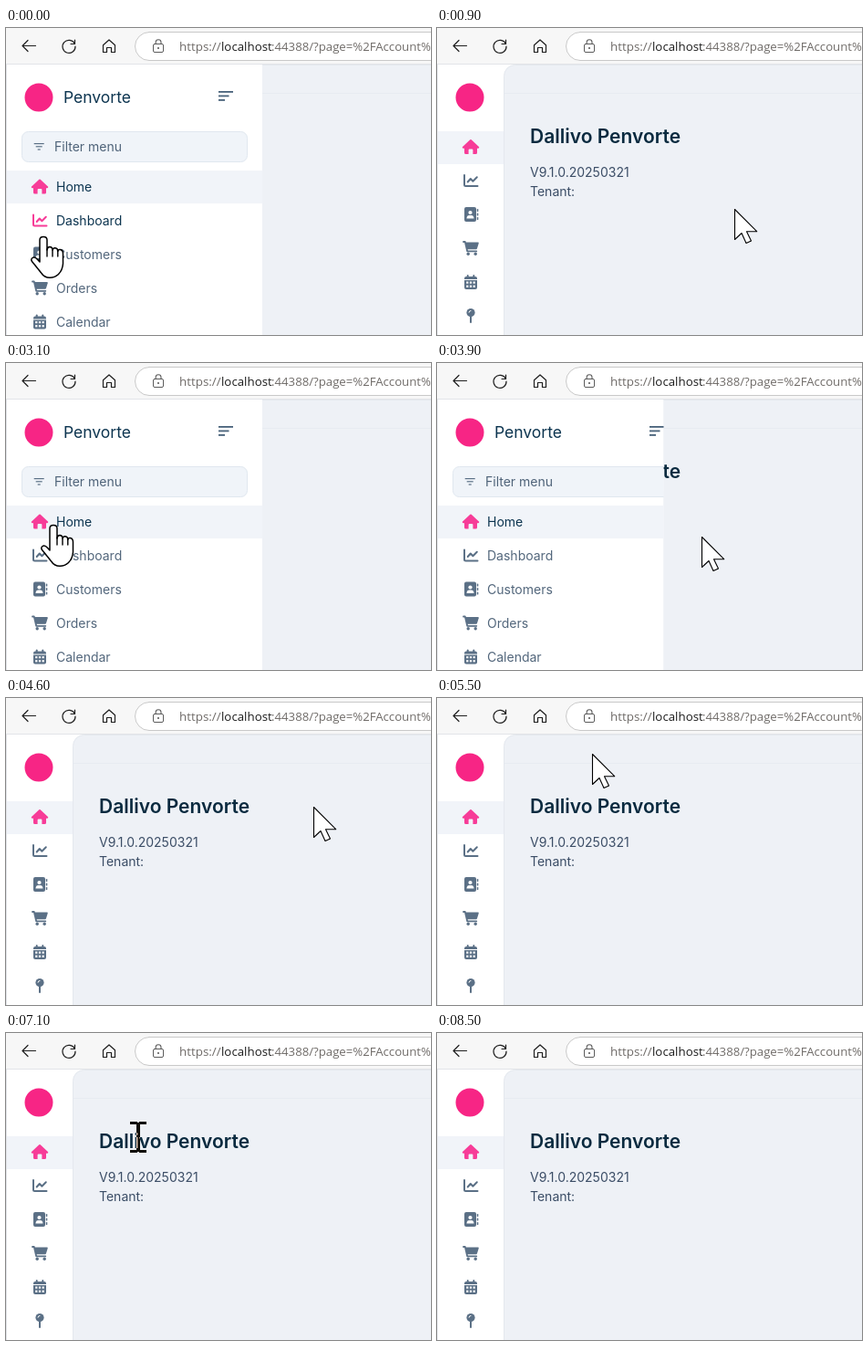
These frames come from a looping animation (466x336 px, 8600 ms). An HTML page with a canvas:

```html
<!DOCTYPE html>
<html lang="en">
<head>
<meta charset="utf-8">
<title>Sidebar menu</title>
<style>
html, body { margin: 0; width: 100%; height: 100%; overflow: hidden; background: #eef1f6; }
canvas { display: block; width: 466px; height: 336px; }
</style>
</head>
<body>
<canvas id="stage" width="466" height="336"></canvas>
<script>
const ctx = document.getElementById('stage').getContext('2d');
const LOOP = 8600, STEP = 100;
const NARROW = 73, WIDE = 281;
const PINK = '#f73c98', GRAY = '#5b7086', DARK = '#0d3550', PAGE = '#eef1f6', ACTIVE = '#f1f4f9';
const UI = 'Inter, Roboto, sans-serif';
const CHROME = '"Open Sans", "Noto Sans", sans-serif';

// Pointer stops: time, x, y
const STOPS = [
  [0, 41, 229], [200, 62, 226], [600, 312, 206], [900, 326, 198], [1700, 270, 188],
  [2100, 219, 180], [2400, 64, 182], [2700, 50, 176], [3100, 52, 178],
  [3500, 58, 238], [3650, 84, 236], [4000, 372, 172], [4300, 388, 138], [4600, 337, 119],
  [5500, 170, 61], [6300, 142, 108], [7100, 145, 114], [7300, 150, 112],
  [7900, 452, 22], [8100, 490, -20]
];
const OPENINGS = [[-1000, 500], [2300, 3850]];
const SLIDE = 200;

const clamp = v => Math.max(0, Math.min(1, v));
const ease = v => v * v * (3 - 2 * v);

function pointerAt(t) {
  for (let i = 1; i < STOPS.length; i++) {
    const [t0, x0, y0] = STOPS[i - 1], [t1, x1, y1] = STOPS[i];
    if (t <= t1) {
      const k = (t - t0) / (t1 - t0);
      return { x: x0 + (x1 - x0) * k, y: y0 + (y1 - y0) * k };
    }
  }
  return null;
}

function openness(t) {
  let most = 0;
  for (const [a, b] of OPENINGS) {
    most = Math.max(most, Math.min(clamp((t - a) / SLIDE), 1 - clamp((t - b) / SLIDE)));
  }
  return ease(most);
}

function text(str, x, y, size, color, weight = 400, family = UI) {
  ctx.font = `${weight} ${size}px ${family}`;
  ctx.fillStyle = color;
  ctx.fillText(str, x, y);
}

function box(x, y, w, h, r, fill, stroke) {
  ctx.beginPath();
  ctx.roundRect(x, y, w, h, r);
  if (fill) { ctx.fillStyle = fill; ctx.fill(); }
  if (stroke) { ctx.strokeStyle = stroke; ctx.lineWidth = 1; ctx.stroke(); }
}

function disc(x, y, r, color) {
  ctx.beginPath();
  ctx.arc(x, y, r, 0, Math.PI * 2);
  ctx.fillStyle = color;
  ctx.fill();
}

function line(d, color, width) {
  ctx.strokeStyle = color;
  ctx.lineWidth = width;
  ctx.stroke(new Path2D(d));
}

function shape(d, color) {
  ctx.fillStyle = color;
  ctx.fill(new Path2D(d));
}

function at(x, y, draw) {
  ctx.save();
  ctx.translate(x, y);
  ctx.lineCap = ctx.lineJoin = 'round';
  draw();
  ctx.restore();
}

// Menu icons, centred on the origin
const icons = {
  home(c) {
    shape('M-9.2 .3L-.7 -7.7Q0 -8.3 .7 -7.7L9.2 .3Q9.5 1.6 8.2 1.7H7V6.5Q7 8 5.5 8H2.4V3.6Q2.4 2.6 1.4 2.6H-1.4Q-2.4 2.6 -2.4 3.6V8H-5.5Q-7 8 -7 6.5V1.7H-8.2Q-9.5 1.6 -9.2 .3Z', c);
  },
  chart(c) {
    line('M-7 -6V4.5Q-7 6 -5.5 6H7.5M-3.3 1.5L-.2 -2L2.4 .7L6.8 -3.7', c, 2);
  },
  book(c, back) {
    box(-7, -8, 13, 16, 2, c);
    for (const y of [-6, -1.5, 3]) box(6.8, y, 1.5, 3, .6, c);
    disc(-.5, -2, 2.1, back);
    shape('M-4.5 4.4Q-4.3 1 -1.5 1H.5Q3.3 1 3.5 4.4Z', back);
  },
  cart(c) {
    line('M-8 -7H-6.2L-3.8 3.3H6.3', c, 1.8);
    shape('M-5.6 -6.4H8Q9 -6.3 8.7 -5.2L7 .3Q6.7 1.2 5.8 1.2H-4Z', c);
    disc(-2.8, 6.3, 1.7, c);
    disc(5.2, 6.3, 1.7, c);
  },
  calendar(c, back) {
    box(-7, -6, 14, 14, 2, c);
    box(-4.3, -8, 2, 4, 1, c);
    box(2.3, -8, 2, 4, 1, c);
    ctx.fillStyle = back;
    ctx.fillRect(-7, -3, 14, 1);
    for (const y of [-.5, 3.6]) for (const x of [-4.8, -1.1, 2.6]) ctx.fillRect(x, y, 2.2, 2.2);
  },
  pin(c, back) {
    disc(0, -3.5, 4.6, c);
    line('M0 1V7', c, 2);
    line('M-2 -3.8Q-1.8 -5.5 0 -5.6', back, 1);
  }
};
const MENU = [['home', 'Home'], ['chart', 'Dashboard'], ['book', 'Customers'],
  ['cart', 'Orders'], ['calendar', 'Calendar'], ['pin', 'Places']];

function browserBar() {
  ctx.fillStyle = '#f7f7f7';
  ctx.fillRect(0, 0, 466, 39);
  at(0, 0, () => {
    const ink = '#1f1f1f';
    line('M32.5 19.5H18M24 13.5L18 19.5L24 25.5', ink, 1.2);
    line('M75.3 17.3A7 7 0 1 0 76 20M75.5 13V17.5H71', ink, 1.2);
    line('M106.5 18.8L113 13L119.5 18.8V26.5H115.5V21.5H110.5V26.5H106.5Z', ink, 1.2);
    box(141.5, 4.5, 360, 31, 15.5, '#fff', '#c9c9c9');
    box(161.5, 17.5, 11, 9, 1.5, null, '#5c5c5c');
    line('M164.2 17V15.6A2.9 2.9 0 0 1 170 15.6V17', '#5c5c5c', 1.1);
    disc(167, 22, 1.1, '#5c5c5c');
  });
  text('https://', 190, 25, 13.4, '#6f6b68', 400, CHROME);
  text('localhost', 236, 25, 13.3, '#1b1b1b', 400, CHROME);
  text(':44388/?page=%2FAccount%', 291, 25, 13.2, '#6f6b68', 400, CHROME);
}

function page() {
  ctx.fillStyle = '#fff';
  ctx.fillRect(0, 40, 100, 296);
  box(73.5, 40.5, 420, 320, [12, 0, 0, 0], PAGE, '#e4e8ee');
  ctx.fillStyle = '#e7ebf1';
  ctx.fillRect(74, 71, 392, 1);
  text('Dallivo Penvorte', 102, 126, 21, '#0a2a3f', 600);
  text('V9.1.0.20250321', 102, 163, 14, '#3b4d66');
  text('Tenant:', 102, 184, 14, '#3b4d66');
}

function sidebar(open, pointer) {
  const wide = open > 0;
  const width = NARROW + (WIDE - NARROW) * open;
  const top = wide ? 156 : 113;
  ctx.save();
  ctx.beginPath();
  ctx.rect(0, 40, width, 296);
  ctx.clip();
  ctx.fillStyle = '#fff';
  ctx.fillRect(0, 40, width, 296);
  disc(36, 76, 15.5, '#f72585');

  if (wide) {
    text('Penvorte', 63, 82, 17.5, DARK);
    ctx.fillStyle = '#48627a';
    [[70, 16], [74.5, 11.5], [79, 7]].forEach(([y, w]) => ctx.fillRect(233, y - 1, w, 1.8));
    box(17.5, 113.5, 247, 33, 7, '#f0f4f9', '#e0e7ef');
    ctx.fillStyle = GRAY;
    [[126, 11], [129.2, 7], [132.4, 3]].forEach(([y, w]) => ctx.fillRect(36.2 - w / 2, y, w, 1.2));
    text('Filter menu', 53, 135, 14, '#4f6379');
  }

  ctx.fillStyle = ACTIVE;
  ctx.fillRect(0, top, width, 36);
  MENU.forEach(([icon, label], i) => {
    const y = top + 37 * i;
    const hover = pointer && pointer.x < width && pointer.y >= y && pointer.y < y + 37;
    const lit = i === 0 || hover;
    at(37, y + (wide ? 17.5 : 17), () => icons[icon](lit ? PINK : GRAY, i === 0 ? ACTIVE : '#fff'));
    if (wide) text(label, 55, y + 23, 14, lit ? DARK : '#53677c');
  });
  ctx.restore();
  ctx.fillStyle = '#e2e4e8';
  ctx.fillRect(0, 40, 1, 296);
  ctx.fillRect(0, 39, 466, 1);
  return width;
}

function arrow() {
  const d = 'M.5 .5V33.5L8 26.5L13 37.5L18.5 35L13.5 24.7H24.7Z';
  shape(d, '#fff');
  line(d, '#000', 1.1);
}

function hand() {
  const d = 'M-4 27V3Q-4 -.5 0 -.5Q4 -.5 4 3V14Q4.5 10.5 7 10.5Q10 10.7 10 14Q10.5 11.5 13 11.7Q15.8 12 15.8 15.3Q16.3 13.2 18.5 13.6Q21.5 14.2 21.5 18V29Q21 36 16.5 40.5Q12.5 44.3 7 44.3Q1 44.2 -2 39.5L-12.5 26.5Q-14.3 23.7 -11.5 22.3Q-9.3 21.6 -7.3 23.5Z';
  shape(d, '#fff');
  line(d, '#000', 1.5);
  line('M4 13V21M10 14V21M15.8 15V21', '#000', 1.4);
}

// The text cursor inverts what lies under it
function beam() {
  ctx.globalCompositeOperation = 'difference';
  shape('M-9 -17H-1V-16H1V-17H9V-14H2V14H9V17H1V16H-1V17H-9V14H-2V-14H-9Z', '#fff');
}

function cursor(p, width) {
  const overHeading = p.x > 102 && p.x < 268 && p.y > 106 && p.y < 132;
  const overMenu = p.x < width && p.y > 112;
  at(Math.round(p.x), Math.round(p.y), overMenu ? hand : overHeading ? beam : arrow);
}

function frame(now) {
  const t = Math.floor((now % LOOP) / STEP) * STEP;
  const pointer = pointerAt(t);
  page();
  const width = sidebar(openness(t), pointer);
  browserBar();
  if (pointer) cursor(pointer, width);
  requestAnimationFrame(frame);
}
frame(performance.now());
</script>
</body>
</html>
```
